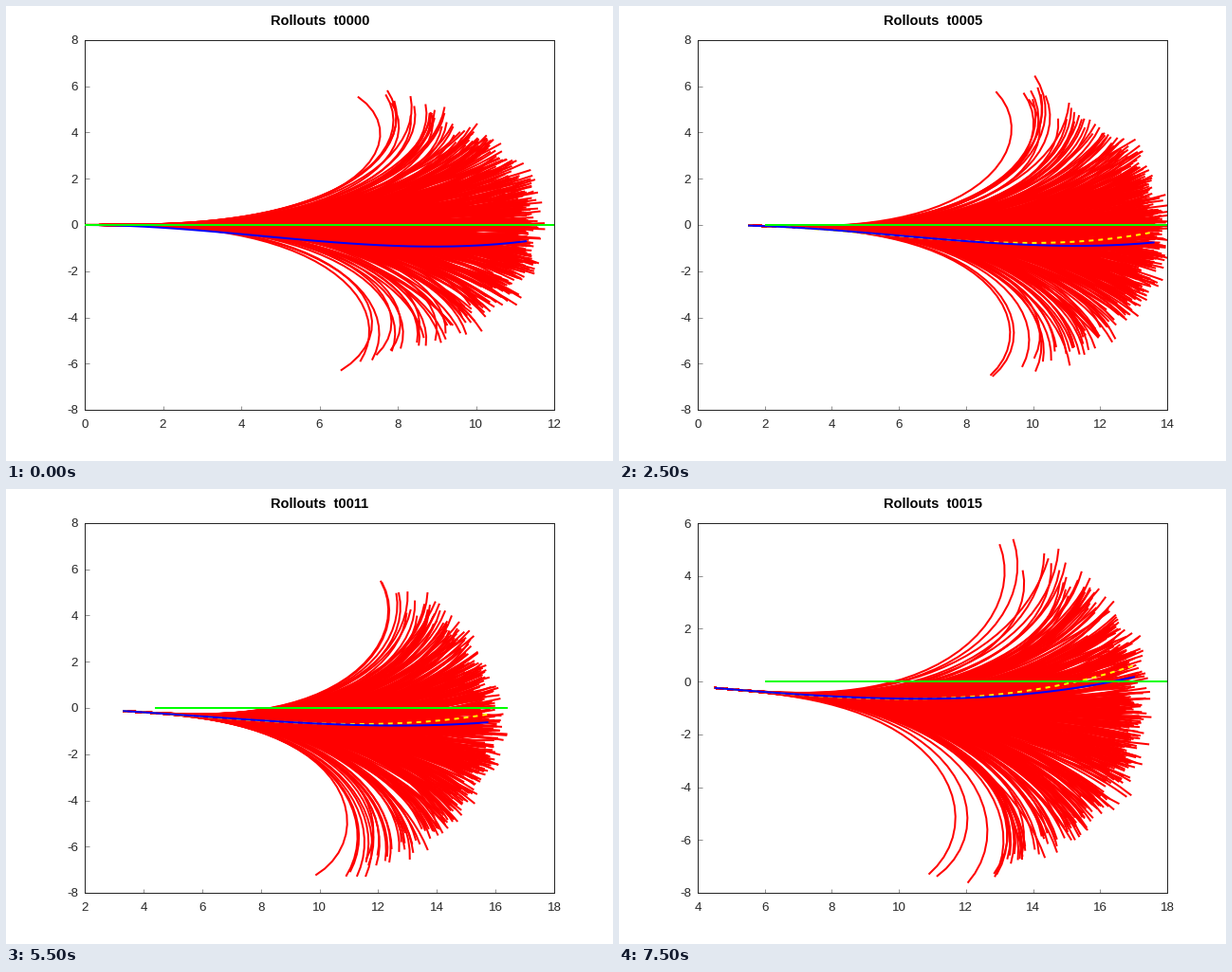
Recreate the animation shown at these times as a matplotlib script. Size 640 px wide and 480 px high, loop 8 s.

```python
import matplotlib.pyplot as plt
import numpy as np
from matplotlib.animation import FuncAnimation
from matplotlib.collections import LineCollection

plt.rcParams["font.family"] = "Liberation Sans"

W, H, DPI = 640, 480, 100
PX = 72 / DPI
LEFT, RIGHT, TOP, BOTTOM = 83, 578, 36, 426   # plot box in pixels
FRAMES, STEP_MS = 16, 500
ROLLOUTS, STEPS = 420, 30
U = np.linspace(0, 1, STEPS + 1)

# End heights of the two plans at a few times
KEYS = [0, 1, 3, 7, 9, 11, 13, 15]
BEST_END = [-.70, -.75, -.88, -.63, -.42, -.62, -1.22, .18]
PRIOR_END = [0, -.70, -.85, .25, -.95, -.27, -.85, .62]
LOW_TOP = (4, 8, 10, 13, 15)


def limits(t):
    left = 2 * np.floor(0.15 * t + 1e-6)
    right = 2 * np.ceil(0.2 * t + 6 - 1e-6)
    return left, right, -10 if t == 12 else -8, 6 if t in LOW_TOP else 8


def pose(t):
    """Position and heading of the vehicle, and how far it looks ahead."""
    reach = 11.3 + 1.3 * (1 - np.exp(-t / 5))
    return 0.3 * t, -0.00107 * t ** 2, -0.0071 * t, reach


def plan(t, ends):
    """Cubic that leaves along the heading and sags on its way to the end."""
    x, y, slope, reach = pose(t)
    end = np.interp(t, KEYS, ends)
    sag = -0.65 if end else 0
    rise = slope * reach
    mid, far = sag - y - rise / 2, end - y - rise
    bend = (8 * mid - far) * U ** 2 + (2 * far - 8 * mid) * U ** 3
    return x + reach * U, y + rise * U + bend


def rollouts(t):
    """Fan of paths whose curvature grows steadily from zero."""
    rng = np.random.default_rng(40 + t)
    x, y, slope, reach = pose(t)
    _, _, low, high = limits(t)
    n = 2 * ROLLOUTS
    turn = rng.normal(0, 0.77, (n, 1))
    early = rng.normal(0, 0.35, (n, 1))
    step = reach / STEPS * rng.normal(1, 0.022, (n, 1))
    u = (U[:-1] + U[1:]) / 2
    heading = slope + u ** 2 * (turn + early * (1 - u))
    z = np.zeros((n, STEPS + 1), complex)
    z[:, 1:] = np.cumsum(step * np.exp(1j * heading), axis=1)
    z += x + 1j * y
    inside = (z.imag.min(axis=1) > low) & (z.imag.max(axis=1) < high)
    z = z[inside & (np.abs(turn[:, 0]) < 2.7)][:ROLLOUTS]
    return np.stack([z.real, z.imag], axis=-1)


fig = plt.figure(figsize=(W / DPI, H / DPI), dpi=DPI, facecolor="white")
ax = fig.add_axes([LEFT / W, 1 - BOTTOM / H,
                   (RIGHT - LEFT) / W, (BOTTOM - TOP) / H])
INK = (0.15, 0.15, 0.15)
for spine in ax.spines.values():
    spine.set(color=INK, linewidth=PX, zorder=0.5)
ax.set_axisbelow(True)
ax.tick_params(direction="in", length=4.5 * PX, width=0.5 * PX, color=INK,
               labelcolor=INK, labelsize=13.33 * PX)
ax.tick_params(axis="x", pad=10 * PX)
ax.tick_params(axis="y", pad=7 * PX)
title = fig.text(331 / W, 1 - 20 / H, "", ha="center", va="baseline",
                 size=14.67 * PX, weight="bold", color="black")

LW = 2 * PX
fan = LineCollection([], colors="red", linewidths=LW, capstyle="butt", zorder=2)
ax.add_collection(fan, autolim=False)
prior, = ax.plot([], [], color="yellow", lw=LW, ls=(0, (2.5, 2.5)),
                 dash_capstyle="butt", zorder=3)
best, = ax.plot([], [], color="blue", lw=LW, solid_capstyle="butt", zorder=4)
goal, = ax.plot([], [], color="lime", lw=LW, solid_capstyle="butt", zorder=5)


def draw(t):
    left, right, low, high = limits(t)
    xt = np.arange(left, right + 1, 2)
    yt = np.arange(low, high + 1, 2)
    ax.set_xticks(xt, [f"{v:.0f}" for v in xt])
    ax.set_yticks(yt, [f"{v:.0f}" for v in yt])
    ax.set(xlim=(left, right), ylim=(low, high))
    title.set_text(f"Rollouts  t{t:04d}")
    fan.set_segments(rollouts(t))
    prior.set_data(*plan(t, PRIOR_END))
    best.set_data(*plan(t, BEST_END))
    goal.set_data([0.4 * t, 0.4 * t + 12], [0, 0])
    return fan, prior, best, goal, title


anim = FuncAnimation(fig, draw, frames=FRAMES, interval=STEP_MS,
                     repeat=True, repeat_delay=0, blit=False)
plt.show()
```
